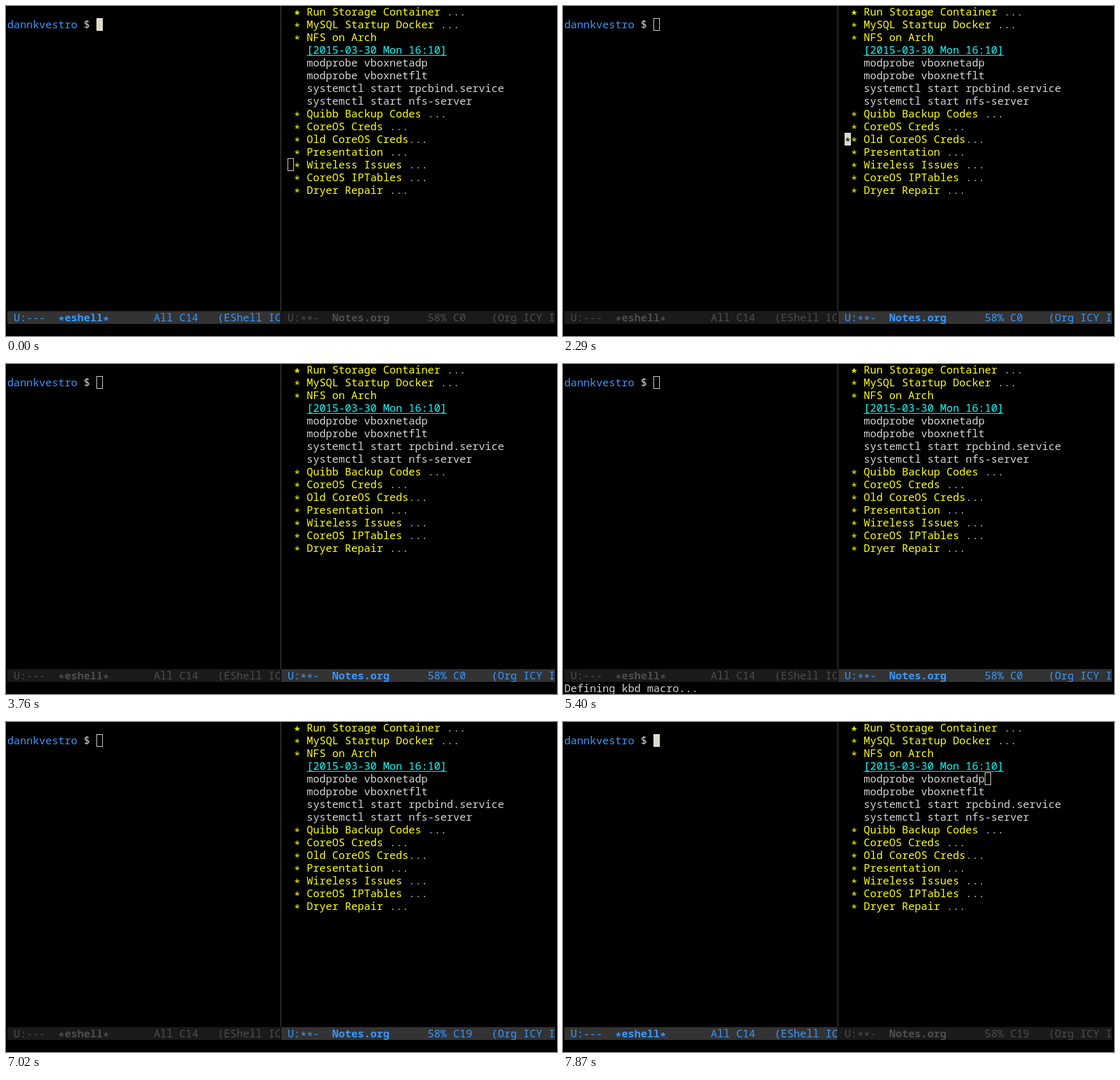
These frames come from a looping animation (865 by 518 pixels, 8 s). An HTML page with a canvas:

```html
<!DOCTYPE html>
<html lang="en">
<head>
<meta charset="utf-8">
<title>Editor session</title>
<style>
  html, body { margin: 0; width: 100%; height: 100%; overflow: hidden; background: #000; }
  canvas { display: block; }
</style>
</head>
<body>
<canvas id="stage" width="865" height="518"></canvas>
<script>
const ctx = document.getElementById('stage').getContext('2d');
const LOOP = 8000, CELL = 10, LINE = 20;
const LEFT = 2, RIGHT = 442, MODE_ROW = 24, ECHO_ROW = 25;
const FONT = '16.667px "Noto Sans Mono", "DejaVu Sans Mono", monospace';
const TEXT = '#d3d3d3', YELLOW = '#ffff00', CYAN = '#00ffff', BLUE = '#3797ff';
const CURSOR = '#dcdccc', REGION = '#7f073f';

const notes = [
  '* Run Storage Container ...',
  '* MySQL Startup Docker ...',
  '* NFS on Arch',
  '[2015-03-30 Mon 16:10]',
  'modprobe vboxnetadp',
  'modprobe vboxnetflt',
  'systemctl start rpcbind.service',
  'systemctl start nfs-server',
  '* Quibb Backup Codes ...',
  '* CoreOS Creds ...',
  '* Old CoreOS Creds...',
  '* Presentation ...',
  '* Wireless Issues ...',
  '* CoreOS IPTables ...',
  '* Dryer Repair ...'
];

// [time, value]: the last entry that has started applies.
const shellBlink = [[0, true], [40, false], [520, true], [1010, false], [1510, true]];
const OFF = null, LINE_END = [4, 22];
const onHeading = row => [row, 0];
const onBody = row => [row, 3];
const notesCursor = [
  [0, onHeading(12)], [2100, OFF], [2140, onHeading(11)], [2290, onHeading(10)],
  [2460, OFF], [2500, onHeading(9)], [2620, OFF], [2660, onHeading(8)], [2780, onBody(7)],
  [2940, OFF], [2980, onBody(6)], [3100, OFF], [3140, onBody(5)], [3260, onBody(4)],
  [3760, OFF], [4260, onBody(4)], [4760, OFF], [4940, onBody(4)], [5400, OFF], [5900, onBody(4)],
  [6320, OFF], [6360, LINE_END], [6810, OFF], [7060, LINE_END], [7510, OFF], [7830, LINE_END]
];
const echoArea = [[0, ''], [4900, 'Defining kbd macro...'], [5990, 'Mark set'], [6320, '']];

const valueAt = (track, t) => track.filter(([since]) => since <= t).pop()[1];
const rowTop = row => row * LINE - 1;

function box(x, y, w, h, color) {
  ctx.fillStyle = color;
  ctx.fillRect(x, y, w, h);
}

function print(text, x, row, color, weight = 300) {
  ctx.font = weight + ' ' + FONT;
  ctx.fillStyle = color;
  [...text].forEach((ch, i) => {
    const drop = ch === '*' ? 4 : 0; // stars sit at mid height
    ctx.fillText(ch, x + i * CELL, rowTop(row) + 16 + drop);
  });
}

function drawCursor(x, row, solid, under = '') {
  if (solid) {
    box(x, rowTop(row), CELL, LINE, CURSOR);
    print(under, x, row, '#000');
  } else {
    ctx.strokeStyle = CURSOR;
    ctx.strokeRect(x + .5, rowTop(row) + .5, CELL - 1, LINE - 1);
  }
}

function modeLine(x, from, to, active, parts) {
  ctx.save();
  ctx.beginPath();
  ctx.rect(from, rowTop(MODE_ROW), to - from, LINE);
  ctx.clip();
  box(from, rowTop(MODE_ROW), to - from, LINE, active ? '#333333' : '#1a1a1a');
  for (const [col, text, weight] of parts)
    print(text, x + col * CELL, MODE_ROW, active ? BLUE : '#4d4d4d', weight);
  ctx.restore();
}

function drawShell(t, active) {
  print('dannkvestro', LEFT, 1, BLUE);
  print('$', LEFT + 12 * CELL, 1, TEXT);
  if (!active || valueAt(shellBlink, t)) drawCursor(LEFT + 14 * CELL, 1, active);

  const parts = [[1, 'U:---'], [8, '*eshell*', 700], [23, 'All'], [27, 'C14'], [33, '(EShell IC']];
  // The first cells of the line switch one step ahead of the rest.
  const early = t < 1700 || t >= 7830;
  modeLine(LEFT, LEFT, 82, early, parts);
  modeLine(LEFT, 82, 431, active, parts);
}

function drawNotes(t, active) {
  if (t >= 6320 && t < 7020) box(RIGHT + 3 * CELL, rowTop(4), 19 * CELL, LINE, REGION);

  notes.forEach((line, row) => {
    const x = RIGHT + 3 * CELL;
    if (line[0] === '*') {
      const title = line.slice(2).replace('...', '');
      print('*', RIGHT + CELL, row, YELLOW, row ? 300 : 700);
      print(title, x, row, YELLOW);
      if (line.endsWith('...')) print('...', x + title.length * CELL, row, '#a8a8a8');
    } else if (line[0] === '[') {
      print(line, x, row, CYAN);
      box(x, rowTop(row) + 18, line.length * CELL, 1, CYAN);
    } else {
      print(line, x, row, TEXT);
    }
  });

  const place = valueAt(notesCursor, t);
  if (place) {
    const [row, col] = place;
    const under = col === 0 ? '*' : col === 3 ? notes[row][0] : '';
    drawCursor(RIGHT + col * CELL, row, active, under);
  }
  modeLine(RIGHT, 432, 862, active, [
    [0, 'U:**-'], [7, 'Notes.org', 700], [22, '58%'],
    [26, t < 6320 ? 'C0' : 'C19'], [32, '(Org ICY I']
  ]);
}

function draw(t) {
  const shellActive = t < 1740 || t >= 7870;
  box(0, 0, 865, 518, '#000');
  box(431, 0, 1, 479, '#484848');
  drawShell(t, shellActive);
  drawNotes(t, !shellActive);
  print(valueAt(echoArea, t), LEFT, ECHO_ROW, TEXT);
}

const startTime = performance.now();
function tick() {
  draw((performance.now() - startTime) % LOOP);
  requestAnimationFrame(tick);
}
tick();
</script>
</body>
</html>
```
